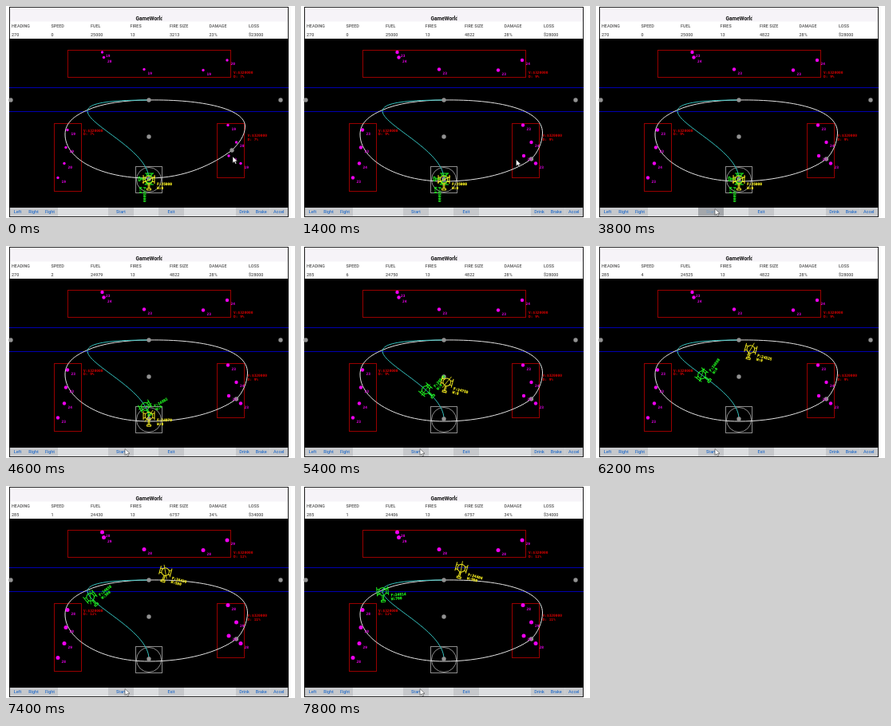
An HTML page for the animation above (8000 ms loop, 362 by 266 pixels).

```html
<!DOCTYPE html>
<html lang="en">
<head>
<meta charset="utf-8">
<title>Helicopter game</title>
<style>
  html, body { margin: 0; width: 100%; height: 100%; overflow: hidden; background: #fff; }
  svg { display: block; width: 362px; height: 266px; }
  text { font: 500 5.4px Roboto, sans-serif; fill: #555; white-space: pre; }
  .title { font-weight: 700; font-size: 6.6px; fill: #111; }
  .mono text { font: 700 4.5px "DejaVu Sans Mono", monospace; fill: inherit; }
  .button text { fill: #2b70c9; text-anchor: middle; }
  .button rect { fill: #c6c8cb; }
  .pressed rect { fill: #a4a7ab; }
  .pressed text { fill: #7f9dbd; }
  .line { fill: none; stroke-width: 1; }
</style>
</head>
<body>
<svg id="stage" viewBox="0 0 362 266">
  <defs>
    <clipPath id="titleClip"><rect x="150" y="8" width="45.5" height="14"/></clipPath>
    <g id="heli" class="line" stroke-width=".8">
      <circle r="4.8"/>
      <path d="M-7-6V5M7-6V5M-7-3H-4M4-3H7M-7 2.5H-4M4 2.5H7M-.8 5V11M.8 5V11M-2.5 11H2.5V13H-2.5Z"/>
    </g>
  </defs>
  <rect x="4.5" y="1.5" width="349" height="263" fill="#fff" stroke="#1a1a1a"/>
  <rect x="5" y="2" width="348" height="17.5" fill="#f6f3f8"/>
  <text class="title" x="162.5" y="17.8" clip-path="url(#titleClip)">GameWorld</text>
  <g id="stats"></g>
  <rect x="4" y="41" width="350" height="212" fill="#000"/>
  <path class="line" d="M4 102.5H354M4 132.5H354" stroke="#0000b0"/>
  <g id="buildings" class="mono" fill="#d80000"></g>
  <g class="line" stroke="#8c8c8c">
    <rect x="162.5" y="201.5" width="33" height="33"/>
    <circle cx="179" cy="218" r="15.5"/>
  </g>
  <path id="loop" class="line" stroke="#e4e4e4"/>
  <path id="route" class="line" stroke="#35c4c0"/>
  <g id="nodes" fill="#929292"></g>
  <g id="fires" class="mono" fill="#f000f0"></g>
  <g id="helis" class="mono"></g>
  <rect x="5" y="253" width="348" height="11" fill="#dcdee0"/>
  <g id="buttons"></g>
  <path id="cursor" d="M0 0V8L2 6.2L3.4 9.2L4.7 8.6L3.4 5.8H6Z" fill="#fff" stroke="#222" stroke-width=".5"/>
</svg>
<script>
const DURATION = 8000, STEP = 200;
const $ = id => document.getElementById(id);

function add(parent, tag, attrs = {}, text = '') {
  const el = document.createElementNS('http://www.w3.org/2000/svg', tag);
  for (const key in attrs) el.setAttribute(key, attrs[key]);
  el.textContent = text;
  return parent.appendChild(el);
}
const label = (parent, x, y, text) => add(parent, 'text', { x, y }, text);
const clamp = v => Math.max(0, Math.min(1, v));
const mix = (a, b, p) => a + (b - a) * p;
const progress = (t, from, to) => clamp((t - from) / (to - from));

const stats = ['HEADING', 'SPEED', 'FUEL', 'FIRES', 'FIRE SIZE', 'DAMAGE', 'LOSS'].map((name, i) => {
  const x = 7 + i * 49.5;
  label($('stats'), x, 27, name);
  return label($('stats'), x, 38, '');
});

const buildings = [
  [77.5, 55.5, 204, 34, 285, 85],
  [60.5, 147.5, 34, 85, 97, 157.5],
  [264.5, 147.5, 34, 68, 302.5, 164]
].map(([x, y, width, height, tx, ty]) => {
  const g = $('buildings');
  add(g, 'rect', { x, y, width, height, class: 'line', stroke: '#980000' });
  label(g, tx, ty, 'V:$320000');
  return label(g, tx, ty + 4.6, '');
});

const fires = [
  [120.5, 58], [122.5, 64.5], [173, 79.5], [247, 80.5], [277, 68],
  [77, 155.5], [75, 177.5], [73, 197.5], [65, 215.5],
  [278, 149.5], [288.5, 171], [279, 188], [294, 197.5]
].map(([cx, cy]) => {
  const dot = add($('fires'), 'circle', { cx, cy });
  return { dot, text: label($('fires'), cx + 4.5, cy + 6.3, '') };
});

const nodes = [[6, 118], [344, 118], [179, 118], [179, 164], [179, 217], [283, 181]]
  .map(([cx, cy]) => add($('nodes'), 'circle', { cx, cy, r: 2.7 }));
const handle = nodes[5];

function makeHeli(color) {
  const root = add($('helis'), 'g', { fill: color, stroke: color, 'stroke-width': .2 });
  add(root, 'use', { href: '#heli' });
  const rotor = add(root, 'path', { d: 'M-9 0H9', 'stroke-width': .8 });
  const fuel = label(root, 10, 7, ''), water = label(root, 10, 11.7, '');
  return (x, y, angle, spin, f, w) => {
    root.setAttribute('transform', `translate(${x} ${y}) rotate(${angle})`);
    rotor.setAttribute('transform', `rotate(${spin})`);
    fuel.textContent = 'F:' + f;
    water.textContent = 'W:' + w;
  };
}
const placeGreen = makeHeli('#20f020'), placeYellow = makeHeli('#f0e820');

const buttons = {};
for (const [name, x, width] of [
  ['Left', 5, 19], ['Right', 24, 21], ['Fight', 45, 20], ['Start', 128, 32],
  ['Exit', 191, 32], ['Drink', 288, 21], ['Brake', 309, 21.5], ['Accel', 330.5, 22.5]
]) {
  const g = buttons[name] = add($('buttons'), 'g', { class: 'button' });
  add(g, 'rect', { x, y: 253, width, height: 10.5 });
  label(g, x + width / 2, 260.2, name);
}

// Cubic route from the helipad to the river.
const routeX = [179, 179, 6, 179], routeY = [217, 164, 118, 118];
$('route').setAttribute('d', 'M' + routeX.map((x, i) => `${x} ${routeY[i]}${i ? '' : 'C'}`).join(' '));

const bezier = ([a, b, c, d], p) => {
  const q = 1 - p;
  return q * q * q * a + 3 * q * q * p * b + 3 * q * p * p * c + p * p * p * d;
};
const slope = ([a, b, c, d], p) => {
  const q = 1 - p;
  return q * q * (b - a) + 2 * q * p * (c - b) + p * p * (d - c);
};

// Speed per game tick; fuel burn is speed squared plus five.
const speeds = [...'1123456666666554443222211111111'].map(Number);
const TURN_TICK = 8, UNIT = 1.19, TILT = 15;

function flight(ticks) {
  const s = { x: 179, y: 218, fuel: 25000, speed: 0 };
  for (let i = 0; i < ticks; i++) {
    const v = s.speed = speeds[Math.min(i, speeds.length - 1)];
    const a = i < TURN_TICK ? 0 : TILT * Math.PI / 180;
    s.x += v * UNIT * Math.sin(a);
    s.y -= v * UNIT * Math.cos(a);
    s.fuel -= v * v + 5;
  }
  return s;
}

function cursorAt(t) {
  const stops = [[0, 284, 189], [800, 289, 194], [1200, 289, 194], [2400, 172, 187], [2800, 172, 187], [3600, 149, 254.5]];
  let i = 0;
  while (i < stops.length - 2 && t > stops[i + 1][0]) i++;
  const [t0, x0, y0] = stops[i], [t1, x1, y1] = stops[i + 1], p = progress(t, t0, t1);
  return [mix(x0, x1, p), mix(y0, y1, p)];
}

function draw(t) {
  const ticks = Math.max(0, 10 + Math.floor((t - 5400) * 7 / 800));
  const stage = t < 1400 ? 0 : t < 7400 ? 1 : 2;
  const heli = flight(ticks);
  const tilt = ticks >= TURN_TICK ? TILT : 0;

  [270 + tilt, heli.speed, heli.fuel, 13, [3213, 4822, 6757][stage],
    [23, 28, 34][stage] + '%', '$' + [23000, 28000, 34000][stage]]
    .forEach((value, i) => stats[i].textContent = value);
  buildings.forEach(el => el.textContent = 'D: ' + [7, 9, 11][stage] + '%');
  fires.forEach(({ dot, text }, i) => {
    dot.setAttribute('r', [1.7, 2.2, 2.5][stage]);
    text.textContent = [19, 23, 28][stage] + (i % 3 === 1);
  });

  const p = progress(t, 0, 800);
  const hx = mix(283, 288.5, p), hy = mix(181, 192, p);
  const right = mix(299.5, 302.5, p), bottom = mix(216, 220, p), mid = mix(151, 159, p);
  handle.setAttribute('cx', hx);
  handle.setAttribute('cy', hy);
  $('loop').setAttribute('d', `M179 118C246 117 ${right} 129 ${right} ${mid}
    C${right} ${mid + 12} ${hx + 8} ${hy - 8} ${hx} ${hy}
    C${hx - 23} ${hy + 17} 225 ${bottom} 179 ${bottom}
    C120 ${bottom} 74 193 74 161C74 147 85 138 101 131C120 122 150 118 179 118`);

  const q = ticks ? .02 * (ticks + 2) : 0;
  const turn = ticks ? Math.atan2(slope(routeX, q), -slope(routeY, q)) * 180 / Math.PI : 90;
  placeGreen(bezier(routeX, q), bezier(routeY, q), turn,
    ticks * 50 + 35, 25000 - 6 * ticks, 100 * Math.max(0, ticks - 24));
  placeYellow(heli.x, heli.y, tilt, ticks * 50 - 25, heli.fuel, 100 * Math.max(0, ticks - 22));

  buttons.Start.setAttribute('class', t >= 3800 && t < 4200 ? 'button pressed' : 'button');
  $('cursor').setAttribute('transform', `translate(${cursorAt(t)})`);
}

function frame(now) {
  draw(Math.floor(now % DURATION / STEP) * STEP);
  requestAnimationFrame(frame);
}
draw(0);
requestAnimationFrame(frame);
</script>
</body>
</html>
```
